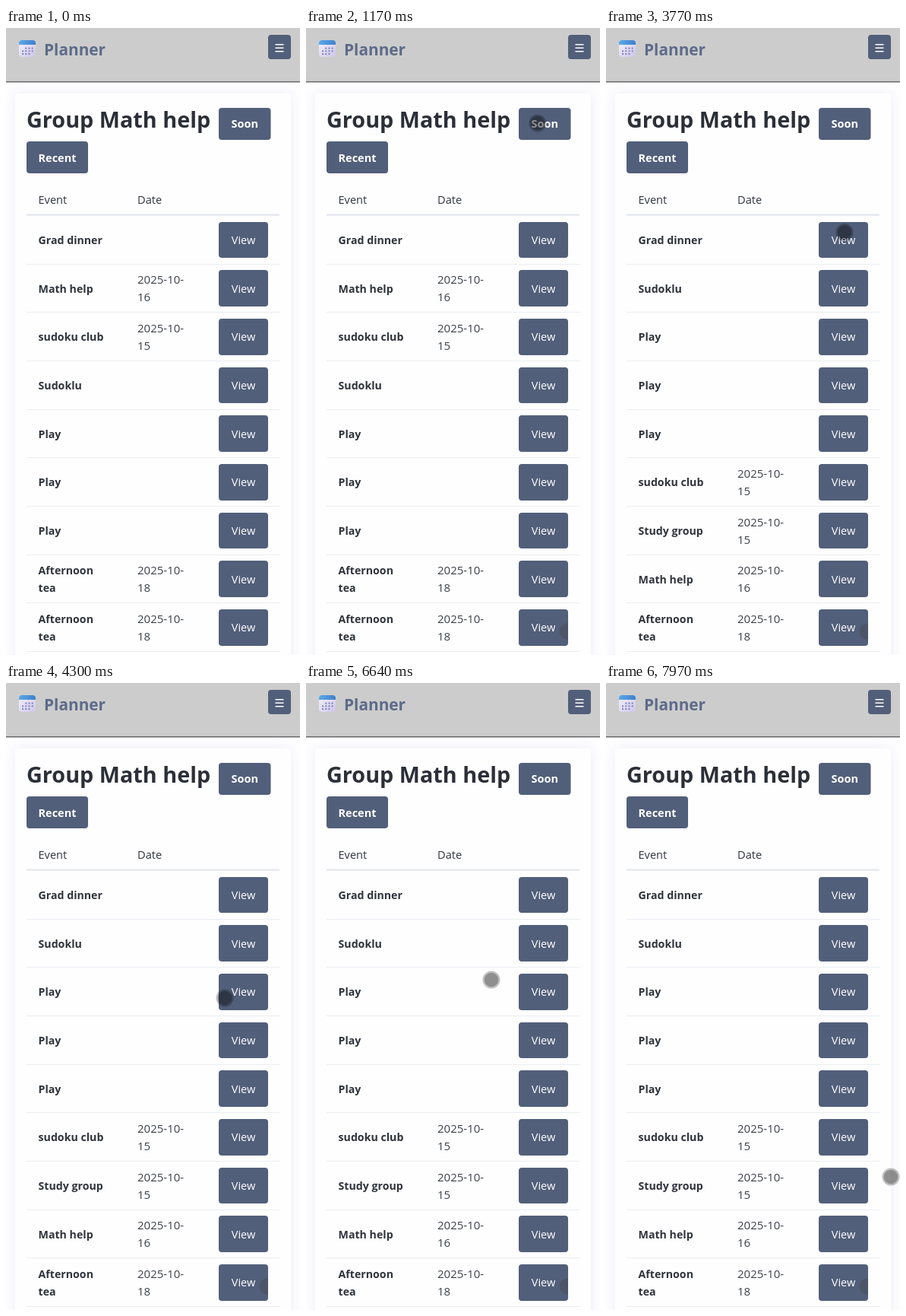
Recreate the animation shown at these times as an HTML page with a canvas. Size 387 by 824 pixels, loop 8 s.

```html
<!DOCTYPE html>
<html lang="en">
<head>
<meta charset="utf-8">
<title>Planner</title>
<style>
html, body { margin: 0; width: 100%; height: 100%; overflow: hidden; background: #fff; }
canvas { display: block; width: 387px; height: 824px; }
</style>
</head>
<body>
<canvas id="stage"></canvas>
<script>
const W = 387, H = 824, LOOP = 8000;
const canvas = document.getElementById('stage');
const dpr = window.devicePixelRatio || 1;
canvas.width = Math.round(W * dpr);
canvas.height = Math.round(H * dpr);
const ctx = canvas.getContext('2d');

const FONT = '"Open Sans", "Noto Sans", sans-serif';
const SLATE = '#525f7a', INK = '#2f343c';
const ROW_TOP = 246.6, ROW_H = 63.67;

const grad = ['Grad dinner'], sudoklu = ['Sudoklu'], play = ['Play'];
const math = ['Math help', 16], club = ['sudoku club', 15];
const study = ['Study group', 15], tea = ['Afternoon tea', 18];
const unsorted = [grad, math, club, sudoklu, play, play, play, tea, tea];
const sorted = [grad, sudoklu, play, play, play, club, study, math, tea];

const ENTER = 130, PRESS = 3110, RELEASE = 3230, SORT = 3430;
const STEP = 200 / 3; // the pointer is redrawn 15 times a second

// Each move curves on from where the last one ended
const origin = { x: 350, y: 830 };
const moves = [
  { from: 130, to: 770, via: [130, 330], x: 88, y: 171 },
  { from: 850, to: 1170, via: [311, 118], x: 311, y: 126 },
  { from: 3230, to: 4300, via: [330, 250], x: 288, y: 414 },
  { from: 5370, to: 5640, via: [283, 417], x: 277, y: 424 },
  { from: 6240, to: 6640, via: [255, 414], x: 244, y: 390 },
  { from: 7040, to: 7700, via: [214, 391], x: 92, y: 808 },
  { from: 7770, to: 7970, via: [142, 337], x: 375, y: 649 }
];

const bezier = (a, b, c, u) => (1 - u) * (1 - u) * a + 2 * u * (1 - u) * b + u * u * c;

function pointerAt(t) {
  const i = moves.findLastIndex(m => t >= m.from);
  const start = moves[i - 1] || origin, m = moves[i];
  const last = Math.round((m.to - m.from) / STEP);
  const step = Math.min(last, Math.floor((t - m.from + 5) / STEP));
  const u = (step + 1) / (last + 1);
  return [bezier(start.x, m.via[0], m.x, u), bezier(start.y, m.via[1], m.y, u)];
}

function rect(x, y, w, h, color) {
  ctx.fillStyle = color;
  ctx.fillRect(x, y, w, h);
}

function round(x, y, w, h, r, color) {
  ctx.beginPath();
  ctx.roundRect(x, y, w, h, r);
  ctx.fillStyle = color;
  ctx.fill();
}

function disc(x, y, r, color) {
  ctx.beginPath();
  ctx.arc(x, y, r, 0, Math.PI * 2);
  ctx.fillStyle = color;
  ctx.fill();
}

function text(str, x, y, size, weight, color, align = 'left') {
  ctx.font = `${weight} ${size}px ${FONT}`;
  ctx.textAlign = align;
  ctx.fillStyle = color;
  ctx.fillText(str, x, Math.round(y));
}

// Edges snap to whole pixels
function button(label, x, y, w, h, weight) {
  const top = Math.round(y), bottom = Math.round(y + h);
  round(x, top, w, bottom - top, 4, SLATE);
  text(label, x + w / 2, y + h / 2 + 5.4, 14.5, weight, '#fff', 'center');
}

function calendar(x, y) {
  const body = ctx.createLinearGradient(x, y, x + 22, y + 22);
  body.addColorStop(0, '#f4f2fa');
  body.addColorStop(1, '#cfc6e8');
  round(x, y, 22, 22, 4, body);
  const top = ctx.createLinearGradient(x, y, x + 22, y);
  top.addColorStop(0, '#5aa9ea');
  top.addColorStop(1, '#4080cc');
  round(x, y, 22, 6, [4, 4, 0, 0], top);
  for (let i = 1; i < 11; i++) {
    const cx = x + 4 + (i % 4) * 4.2, cy = y + 9.5 + Math.floor(i / 4) * 3.8;
    round(cx, cy, 2.2, 2.2, 0.7, '#8088c4');
  }
}

function header() {
  rect(0, 0, W, 70, '#ccc');
  rect(0, 70, W, 1.5, '#686868');
  calendar(17, 16);
  text('Planner', 50, 36, 20.8, 700, '#5d6b89');
  round(345, 9, 30, 32, 4, SLATE);
  for (let i = 0; i < 3; i++) rect(354.5, 21 + i * 4.5, 11, 1.5, '#fff');
}

function card() {
  ctx.save();
  ctx.shadowColor = 'rgba(90, 96, 150, 0.10)';
  ctx.shadowBlur = 18 * dpr;
  round(12, 86, 363, 800, 4, '#fefefe');
  ctx.restore();
  text('Group Math help', 27, 131, 28.8, 700, '#2b2f38');
  button('Soon', 280, 105, 68.5, 41.5, 700);
  button('Recent', 27, 149.4, 81, 41.5, 700);
  text('Event', 42.5, 231, 14.6, 400, INK);
  text('Date', 173, 231, 14.6, 400, INK);
  rect(27, 244.5, 333, 2.2, '#e5e8f0');
}

function row([name, day], i) {
  const top = ROW_TOP + i * ROW_H, mid = top + 32;
  const lines = name.startsWith('Afternoon') ? name.split(' ') : [name];
  const start = mid + 5.4 - (lines.length - 1) * 11.5;
  lines.forEach((s, n) => text(s, 42.5, start + n * 23, 14.2, 700, INK));
  if (day) {
    text('2025-10-', 173, mid - 6, 15, 400, '#3b4048');
    text(day, 173, mid + 17, 15, 400, '#3b4048');
  }
  button('View', 280, top + 8, 65, 47.67, 400);
  rect(27, Math.round(top + ROW_H - 0.6), 333, 1, '#ebedf1');
}

// Faint trace left on the last button after the pointer has passed
function trace() {
  ctx.save();
  ctx.beginPath();
  ctx.rect(280, 764, 65, 48);
  ctx.clip();
  disc(344, 793, 10.5, 'rgba(70, 72, 78, 0.4)');
  ctx.restore();
}

function pointer(x, y, pressed) {
  disc(x, y, 11.5, pressed ? 'rgba(205, 195, 10, 0.75)' : 'rgba(0, 0, 0, 0.24)');
  disc(x, y, 9.3, pressed ? 'rgba(70, 70, 10, 0.22)' : 'rgba(0, 0, 0, 0.26)');
}

function draw(t) {
  ctx.setTransform(dpr, 0, 0, dpr, 0, 0);
  rect(0, 0, W, H, '#fefeff');
  card();
  header();
  (t < SORT ? unsorted : sorted).forEach(row);
  if (t < ENTER) return;
  trace();
  pointer(...pointerAt(t), t >= PRESS && t < RELEASE);
}

const begin = performance.now();
function tick() {
  draw((performance.now() - begin) % LOOP);
  requestAnimationFrame(tick);
}
tick();
</script>
</body>
</html>
```
